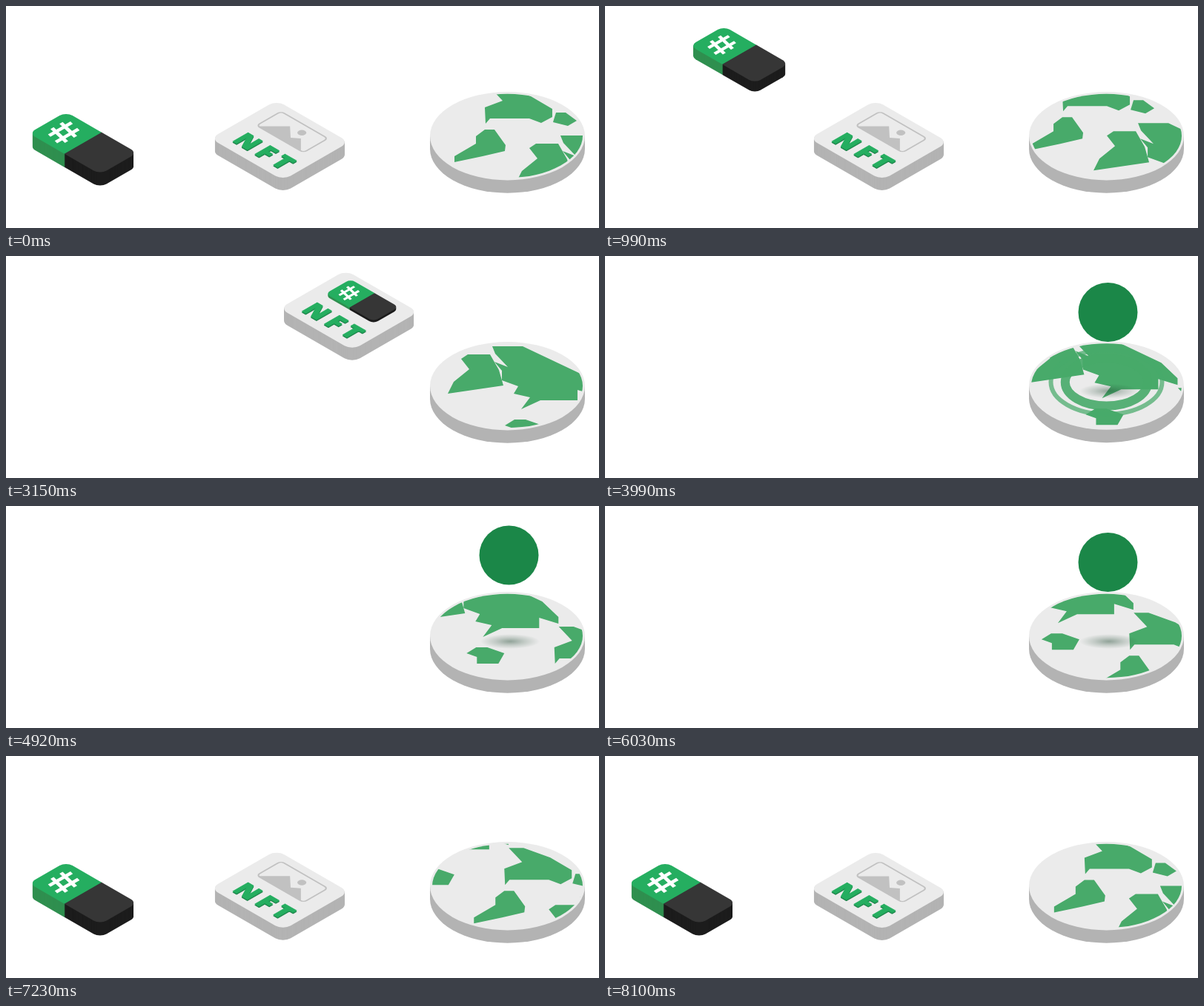
An HTML page with a canvas for the animation above (8.13 s loop, 800 by 300 pixels).

```html
<!DOCTYPE html>
<html>
<head>
<meta charset="utf-8">
<style>
html, body { margin: 0; width: 800px; height: 300px; overflow: hidden; background: #fff; }
canvas { display: block; }
</style>
</head>
<body>
<canvas id="stage" width="800" height="300"></canvas>
<script>
const ctx = document.getElementById('stage').getContext('2d');
const LOOP = 8130, PAN = [237.4, 137];
const GREEN = '#25ae60', LAND = '#48aa6a', FACE = '#ebebeb', SIDE = '#b3b3b3';
const HOP = 720, TOKEN_HOP = 725, TILE_HOP = 2870, FALL = 353, TOKEN_FALL = 6100, TILE_FALL = 6480;
const TOKEN_LAND = TOKEN_HOP + HOP, TILE_LAND = TILE_HOP + HOP;

// Corner points of the land masses on the panning map
const lands = [
  [652,109, 672,109, 708,122, 737,139, 737,150, 722,158, 706,152, 653,152, 647,159, 646,137, 670,128],
  [742,144, 755,144, 770,155, 758,162, 738,157],
  [765,282, 778,274, 793,274, 816,282, 808,296, 779,296, 779,287],
  [646,167, 659,167, 674,188, 673,196, 643,203, 605,211, 605,203, 634,186, 634,176],
  [706,192, 715,186, 745,186, 757,207, 763,228, 688,239, 696,223, 717,206],
  [748,175, 789,175, 867,212, 889,233, 889,242, 863,234, 863,248, 813,248, 787,260,
   799,244, 777,239, 783,229, 761,221, 761,208, 751,196, 769,203, 752,185]
];

const clamp = x => Math.max(0, Math.min(1, x));
const mix = (a, b, p) => a + (b - a) * p;
const inOut = p => p < .5 ? 2 * p * p : 1 - 2 * (1 - p) ** 2;
const arc = p => Math.sin(Math.PI * p) ** 1.7;
const dip = (t, depth) => t < 0 || t > 800 ? 0 : 2.3 * depth * Math.exp(-t / 120) * Math.sin(t / 80);
const drop = (t, height, depth) => -height * (1 - clamp(t / FALL) ** 2) + dip(t - FALL, depth);

function poly(points) {
  ctx.beginPath();
  for (let i = 0; i < points.length; i += 2) ctx.lineTo(points[i], points[i + 1]);
  ctx.closePath();
  ctx.fill();
}

function ellipse(x, y, rx, ry) {
  ctx.beginPath();
  ctx.ellipse(x, y, rx, ry, 0, 0, 7);
}

function iso(x, y, scale, draw) {
  ctx.save();
  ctx.transform(.866 * scale, .5 * scale, -.866 * scale, .5 * scale, x, y);
  draw();
  ctx.restore();
}

function box(x, y, depth, scale, face) {
  for (let d = depth; d > 0; d--) iso(x, y + d, scale, () => face(true));
  iso(x, y, scale, () => face(false));
}

function plate(x, y, w, h, radii, color) {
  ctx.fillStyle = color;
  ctx.beginPath();
  ctx.roundRect(x, y, w, h, radii);
  ctx.fill();
}

function hash() {
  ctx.translate(26, 29.5);
  ctx.transform(1, .25, 0, 1, 0, 0);
  ctx.fillStyle = '#fff';
  for (const s of [-7, 7]) {
    ctx.fillRect(-15, s - 2.5, 30, 5);
    ctx.fillRect(s - 2.5, -17.5, 5, 35);
  }
}

function token(x, y, scale, depth) {
  box(x, y, depth, scale, side => {
    plate(55, 0, 56, 58, [0, 10, 10, 0], side ? '#1c1c1c' : '#363636');
    plate(0, 0, 55.3, 58, [10, 0, 0, 10], side ? '#2f8f4f' : GREEN);
  });
  iso(x, y, scale, hash);
}

function picture() {
  ctx.fillStyle = ctx.strokeStyle = '#c1c1c1';
  ctx.lineWidth = 2;
  ctx.beginPath();
  ctx.roundRect(1, 1, 73, 38, 5);
  ctx.stroke();
  poly([3, 39, 28, 14, 44, 29, 53, 22, 70, 39]);
  ellipse(46, 13.5, 5, 5);
  ctx.fill();
}

function label(color) {
  ctx.font = '800 33px "Open Sans", sans-serif';
  ctx.letterSpacing = '7px';
  ctx.fillStyle = ctx.strokeStyle = color;
  ctx.lineWidth = 1;
  ctx.lineJoin = 'round';
  ctx.fillText('NFT', 19, 89.5);
  ctx.strokeText('NFT', 19, 89.5);
}

function tile(x, y, scale, loaded) {
  ctx.save();
  ctx.translate(x, y);
  ctx.scale(scale, scale);
  box(0, 0, 17, 1, side => plate(0, 0, 113, 103, 12, side ? SIDE : FACE));
  iso(0, 1.5, 1, () => label('#1b8449'));
  iso(0, 0, 1, () => label(GREEN));
  if (loaded) token(6.5, 12, .675, 3);
  else iso(6, 14, 1, picture);
  ctx.restore();
}

function rings(t) {
  for (const [delay, width] of [[0, 6], [103, 12]]) {
    const age = t - TILE_LAND - delay;
    if (age < 0 || age > 800) continue;
    const r = age * .187;
    ctx.globalAlpha = .9 * clamp((800 - age) / 500);
    ctx.strokeStyle = LAND;
    ctx.lineWidth = width;
    ellipse(676.5, 171, r, r * .577);
    ctx.stroke();
  }
  ctx.globalAlpha = 1;
}

function shadow(alpha) {
  const g = ctx.createRadialGradient(0, 0, 0, 0, 0, 40);
  g.addColorStop(0, 'rgba(35,75,52,.45)');
  g.addColorStop(.5, 'rgba(35,75,52,.2)');
  g.addColorStop(1, 'rgba(35,75,52,0)');
  ctx.save();
  ctx.globalAlpha = alpha;
  ctx.translate(680, 183);
  ctx.scale(1, .25);
  ctx.fillStyle = g;
  ellipse(0, 0, 40, 40);
  ctx.fill();
  ctx.restore();
}

function globe(t, shade) {
  ctx.save();
  ctx.translate(0, dip(t - TILE_LAND, 7));
  ctx.fillStyle = SIDE;
  ellipse(676.5, 193, 104.5, 59.7);
  ctx.fill();
  ctx.fillRect(572, 176, 209, 17);
  ctx.fillStyle = FACE;
  ellipse(676.5, 175.7, 104.5, 59.7);
  ctx.fill();
  ellipse(676.5, 175.5, 101.5, 56.7);
  ctx.clip();
  ctx.fillStyle = LAND;
  for (let k = -1; k < 2; k++) {
    ctx.save();
    ctx.translate(PAN[0] * (k - t / LOOP), PAN[1] * (k - t / LOOP));
    lands.forEach(poly);
    ctx.restore();
  }
  rings(t);
  shadow(shade);
  ctx.restore();
}

function coin(t) {
  const rise = clamp((t - TILE_LAND) / 200);
  const bob = -5 * (1 - Math.cos(2 * Math.PI * clamp((t - 3990) / 1620)));
  const bounce = -14 * Math.sin(Math.PI * clamp((t - 3800) / 190));
  const exit = -150 * clamp((t - 6120) / 300) ** 2;
  const y = mix(165, 76, 1 - (1 - rise) ** 2) + bob + bounce + exit;
  ctx.fillStyle = '#1b8748';
  ellipse(678.5, y, 40 * rise, 40 * rise);
  ctx.fill();
}

function render(t) {
  ctx.clearRect(0, 0, 800, 300);
  const coinOn = t > TILE_LAND && t < 6420;
  globe(t, clamp((t - TILE_LAND) / 200) * clamp((6420 - t) / 300));

  if (t < TILE_LAND) {
    const p = clamp((t - TILE_HOP) / HOP), e = inOut(p);
    const scale = 1 - .75 * clamp((p - .8) / .2) ** 2;
    const x = mix(365, 671.5, e) + 4.5 * (1 - scale);
    const y = mix(127.5, 110, e) - 114 * arc(p) + 54 * (1 - scale) + dip(t - TOKEN_LAND, 4);
    tile(x, y, scale, t >= TOKEN_LAND);
  } else if (t > TILE_FALL) {
    tile(365, 127.5 + drop(t - TILE_FALL, 260, 2), 1, false);
  }

  if (t < TOKEN_LAND) {
    const p = clamp((t - TOKEN_HOP) / HOP), e = inOut(p);
    token(mix(81, 371.5, e), mix(143, 139.5, e) - 133 * arc(p), mix(1, .675, e), mix(18, 3, e));
  } else if (t > TOKEN_FALL) {
    token(81, 143 + drop(t - TOKEN_FALL, 260, 2), 1, 18);
  }

  if (coinOn) coin(t);
}

function frame() {
  render(performance.now() % LOOP);
  requestAnimationFrame(frame);
}
frame();
</script>
</body>
</html>
```
